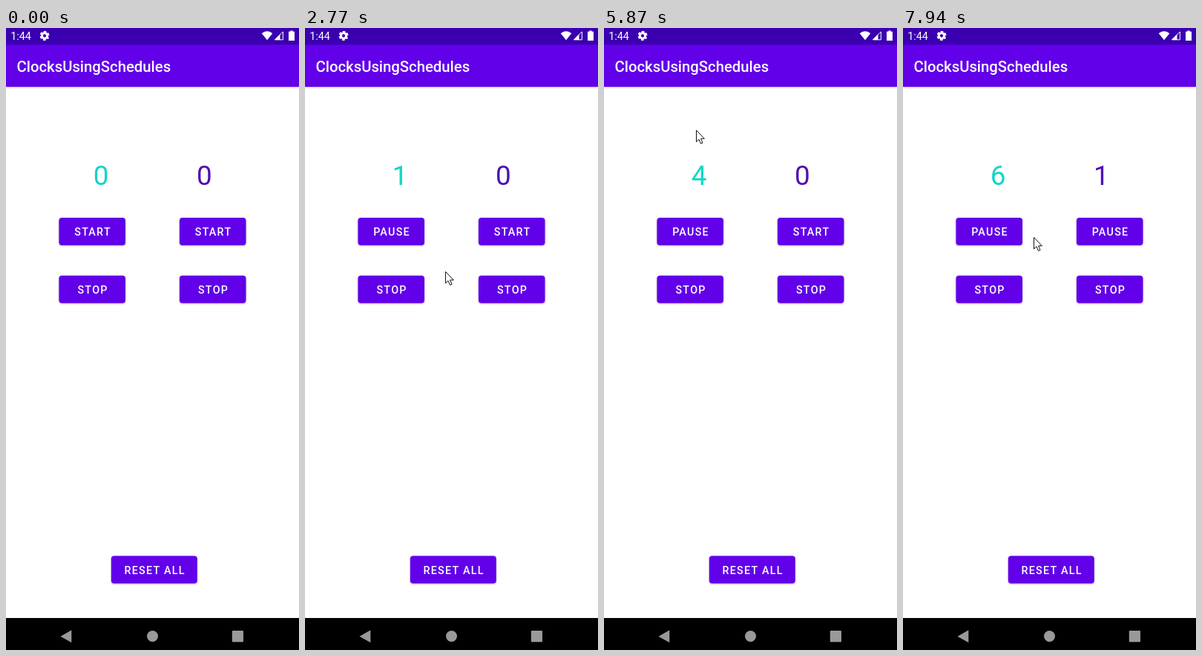
Recreate the animation shown at these times as an HTML page. Size 395 by 836 pixels, loop 8000 ms.

```html
<!DOCTYPE html>
<html lang="en">
<head>
<meta charset="utf-8">
<title>Timers</title>
<style>
  html, body { margin: 0; width: 100%; height: 100%; overflow: hidden; background: #fff; }
  svg { display: block; width: 395px; height: 836px; font-family: Roboto, sans-serif; }
  .label { font-size: 14.3px; font-weight: 500; letter-spacing: 1.3px; text-anchor: middle; fill: #fff; }
  .count { font-size: 36.9px; text-anchor: middle; }
  .raised { fill: #6200ea; filter: drop-shadow(0 1px 1px rgba(0, 0, 0, .28)); }
</style>
</head>
<body>
<svg viewBox="0 0 395 836">
  <rect class="raised" y="22" width="395" height="57"/>
  <rect width="395" height="22.5" fill="#3a00b0"/>
  <text x="14.5" y="59" font-size="20.3" font-weight="500" fill="#fff">ClocksUsingSchedules</text>

  <g fill="#fff">
    <text x="6.2" y="15.7" font-size="14.35">1:44</text>
    <g transform="translate(52 10.4) rotate(30)" fill="none" stroke="#fff">
      <circle r="3.6" stroke-width="3"/>
      <circle r="5.4" stroke-width="2.2" stroke-dasharray="3.4 2.255" stroke-dashoffset="1.7"/>
    </g>
    <path d="M344.7 7.2Q352 1.2 359.3 7.2L352 16.2Z"/>
    <path d="M373.4 5V15.8H362.6Z" fill="none" stroke="#fff"/>
    <path d="M369.5 8.5V16H362Z"/>
    <path d="M383.4 4.8V3.6H386.6V4.8H389V17H381V4.8Z"/>
  </g>

  <g id="columns"></g>

  <rect y="793" width="395" height="43"/>
  <g fill="#999">
    <path d="M73.5 817.7L88.3 809.3V826.1Z"/>
    <circle cx="197.5" cy="817.5" r="7.5"/>
    <rect x="304.8" y="810" width="15.2" height="15.2" rx="1"/>
  </g>

  <g id="cursor">
    <path d="M.5 .5V16L4 12.7L6.5 18.5L9 17.4L6.5 11.8H11.4Z" fill="#fff" stroke="#111"/>
    <circle id="press" r="12" fill="#f0f01e" opacity=".5"/>
  </g>
</svg>

<script>
const LOOP = 8000, SECOND = 1030, REACTION = 180;
const presses = [1560, 6530];
const $ = id => document.getElementById(id);
const clamp = v => Math.max(0, Math.min(1, v));
const ease = v => v * v * (3 - 2 * v);

// Pointer moves: start, end, x and y reached, sideways bulge of the route
const entry = [0, 280];
const moves = [
  [330, 890, 119, 272, 0],
  [1800, 2110, 189, 327, 0],
  [3040, 3800, 105, 173, -50],
  [3870, 4630, 98, 140, -11],
  [4700, 5180, 124, 137, 0],
  [5380, 5870, 124, 137, -18],
  [5870, 6330, 262, 268, 0],
  [6740, 6920, 190, 274, 0],
  [7060, 7280, 176, 281, 0]
];

function pointer(t) {
  let [x, y] = entry;
  for (const [from, to, endX, endY, bulge] of moves) {
    const k = clamp((t - from) / (to - from));
    x += (endX - x) * ease(k) + bulge * Math.sin(Math.PI * k);
    y += (endY - y) * ease(k);
  }
  return [x, y];
}

const button = (x, y, w, text, id = '') =>
  `<rect class="raised" x="${x}" y="${y}" width="${w}" height="37" rx="4"/>
   <text ${id && `id="${id}"`} class="label" x="${x + w / 2 + .9}" y="${y + 24.2}">${text}</text>`;

function column(press, n) {
  const x = 71.4 + 162.5 * n, [cx, cy] = pointer(press);
  return `<text id="count${n}" class="count" x="${128 + 139.4 * n}" y="211" fill="${n ? '#4c12b2' : '#12d5c5'}"></text>
    <clipPath id="clip${n}"><rect x="${x}" y="255" width="89.6" height="37" rx="4"/></clipPath>
    ${button(x, 255, 89.6, 'START', 'label' + n)}
    <g clip-path="url(#clip${n})"><circle id="ripple${n}" cx="${cx}" cy="${cy}" fill="#fff"/></g>
    ${button(x, 332.7, 89.6, 'STOP')}`;
}

$('columns').innerHTML = presses.map(column).join('') + button(141.8, 709.5, 116, 'RESET ALL');

function drawTimer(press, n, t) {
  const age = t - press, run = age - REACTION;
  $('count' + n).textContent = Math.max(0, Math.floor(run / SECOND));
  $('label' + n).textContent = run < 0 ? 'START' : 'PAUSE';
  $('ripple' + n).setAttribute('r', 70 * clamp((age - 30) / 300));
  $('ripple' + n).setAttribute('opacity', .27 * clamp((550 - age) / 150));
}

function draw(t) {
  presses.forEach((press, n) => drawTimer(press, n, t));
  $('cursor').setAttribute('transform', `translate(${pointer(t)})`);
  $('cursor').style.display = t < moves[0][0] ? 'none' : '';
  const held = presses.some(press => t >= press && t < press + REACTION);
  $('press').style.display = held ? '' : 'none';
}

const start = performance.now();
(function frame() {
  draw((performance.now() - start) % LOOP);
  requestAnimationFrame(frame);
})();
</script>
</body>
</html>
```
